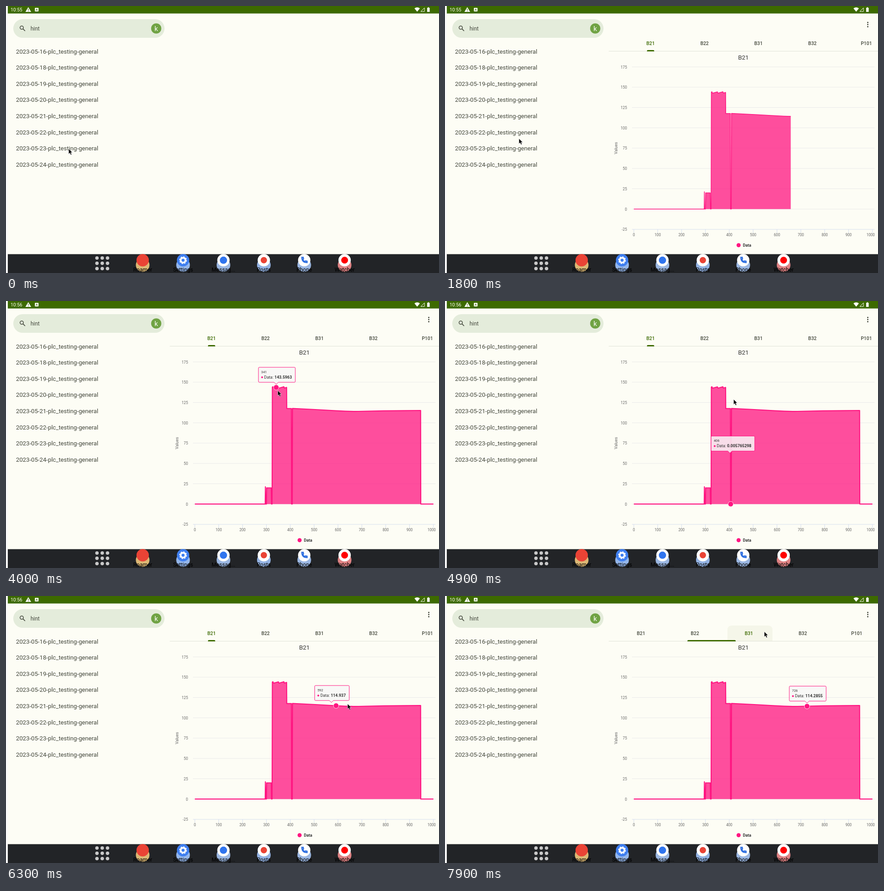
Write an HTML page that moves like this. It is 952 px wide and 588 px high and loops after 8000 ms.

```html
<!DOCTYPE html>
<html lang="en">
<head>
<meta charset="utf-8">
<style>
html, body { margin: 0; width: 100%; height: 100%; overflow: hidden; background: #fdfdf5; }
svg { display: block; width: 952px; height: 588px; font-family: Roboto, "Open Sans", sans-serif; }
.mid { text-anchor: middle; }
.end { text-anchor: end; }
.axis { font-size: 8.15px; fill: #666; }
.tab { font-size: 10.4px; font-weight: 500; fill: #44483d; text-anchor: middle; }
.tab.on { fill: #3d6a00; }
.list { font-size: 13.2px; fill: #44483d; }
.app { font-size: 12px; fill: #000; text-anchor: middle; }
</style>
</head>
<body>
<svg viewBox="0 0 952 588">
  <defs>
    <clipPath id="reveal"><rect id="revealBox" x="411" y="120" width="0" height="380"/></clipPath>
    <clipPath id="pane"><rect x="360" y="60" width="592" height="45"/></clipPath>
  </defs>
  <rect width="952" height="588" fill="#fdfdf5"/>
  <rect width="4" height="588" fill="#fafafa"/>

  <g id="status">
    <rect x="4" width="948" height="16.5" fill="#3d6a00"/>
    <text id="clock" x="10" y="12" font-size="10.4" fill="#fff"></text>
    <path d="M49 2.5L55.3 13H42.7Z" fill="#fff"/>
    <path d="M49 6v3.6M49 10.6v1.4" stroke="#3d6a00" stroke-width="1.2"/>
    <rect x="63.5" y="4" width="8" height="8" rx="1" fill="#fff"/>
    <path d="M65.7 10.3L67.5 5.8L69.3 10.3M66.4 8.9H68.6" fill="none" stroke="#3d6a00" stroke-width=".9"/>
    <path d="M904 12.5L898 5.3Q904 .9 910 5.3Z" fill="#fff"/>
    <path d="M912 12.2H920V4Z" fill="none" stroke="#fff"/>
    <path d="M926 4h1.6v-1.2h2.3V4h1.6v9h-5.5Z" fill="#fff"/>
  </g>

  <g id="search">
    <rect x="16" y="29" width="332.5" height="41" rx="20.5" fill="#e4ecdb"/>
    <circle cx="34.6" cy="47.6" r="3.7" fill="none" stroke="#44483d" stroke-width="1.5"/>
    <path d="M37.4 50.4L42 55" stroke="#44483d" stroke-width="1.7"/>
    <text x="54" y="53.8" font-size="11.9" fill="#44483d">hint</text>
    <circle cx="330.3" cy="49.5" r="11.2" fill="#70a344"/>
    <text class="mid" x="330.3" y="54.7" font-size="15" fill="#fff">k</text>
  </g>
  <g id="list"></g>

  <g id="detail">
    <g fill="#44483d"><circle cx="929.5" cy="36.2" r="1.5"/><circle cx="929.5" cy="40.8" r="1.5"/><circle cx="929.5" cy="45.4" r="1.5"/></g>
    <path d="M360 99.5H952" stroke="#e1e3d8"/>
    <g clip-path="url(#pane)">
      <path id="press" d="M621 99V75Q621 65 631 65H710Q720 65 720 75V99Z" fill="#f5f6e9"/>
      <g id="tabs"><path id="bar" fill="#3d6a00"/></g>
    </g>
  </g>

  <g id="chart">
    <g id="grid"></g>
    <text class="mid" x="656" y="117.8" font-size="13.3" fill="#333">B21</text>
    <text class="mid" transform="translate(379 313) rotate(-90)" font-size="8.9" fill="#666">Values</text>
    <g clip-path="url(#reveal)">
      <path id="area" fill="#ff1581" fill-opacity=".75"/>
      <path id="line" fill="none" stroke="#ff1581" stroke-linejoin="round"/>
    </g>
    <circle cx="645.5" cy="526.7" r="4.5" fill="#ff1581"/>
    <text x="655" y="530" font-size="8.9" font-weight="700" fill="#333">Data</text>
    <g id="hover">
      <circle id="dot" r="5.8" fill="#ff1581" stroke="#fff" stroke-width=".8"/>
      <g id="tip">
        <path id="frame" fill="#f7f7f7" fill-opacity=".85" stroke="#ff1581" stroke-width="1"/>
        <text id="tipX" x="6" y="12.8" font-size="7.4" fill="#333"></text>
        <circle cx="8" cy="22" r="2" fill="#ff1581"/>
        <text x="12.5" y="24.7" font-size="8.9" fill="#333">Data: <tspan id="tipV" font-weight="700"></tspan></text>
      </g>
    </g>
  </g>

  <g id="dock"><rect x="4" y="546.5" width="948" height="41.5" fill="#222427"/></g>
  <path id="cursor" d="M0 0V11.4L2.6 9L4.5 13.3L6.6 12.4L4.7 8.2H8.2Z" fill="#000" stroke="#fff" stroke-width=".6"/>
</svg>
<script>
const $ = id => document.getElementById(id);
const add = (id, html) => $(id).insertAdjacentHTML('beforeend', html);
const set = (id, attrs) => { for (const k in attrs) $(id).setAttribute(k, attrs[k]); };
const show = (id, on) => set(id, { visibility: on ? 'visible' : 'hidden' });
const clamp = v => Math.min(1, Math.max(0, v));
const px = v => 415.2 + .5245 * v;
const py = v => 447.2 - 1.789 * v;

// Static parts
[16, 18, 19, 20, 21, 22, 23, 24].forEach((d, i) =>
  add('list', `<text class="list" x="22" y="${104.8 + 35.55 * i}">2023-05-${d}-plc_testing-general</text>`));

['B21', 'B22', 'B31', 'B32', 'P101'].forEach((name, i) =>
  add('tabs', `<text class="tab" x="${452 + 118.6 * i}" y="86.3">${name}</text>`));
const tabTexts = document.querySelectorAll('.tab');

for (let v = -25; v <= 175; v += 25)
  add('grid', `<path d="M411 ${py(v)}H944.5" stroke="${v < 0 ? '#ccd6eb' : '#e6e6e6'}" stroke-width=".8"/>
    <text class="axis end" x="400" y="${py(v) + 3.4}">${v}</text>`);
for (let v = 0; v <= 1000; v += 100)
  add('grid', `<path d="M${px(v)} 492V499.5" stroke="#ccd6eb" stroke-width=".8"/>
    <text class="axis mid" x="${v < 1000 ? px(v) : 935.8}" y="507">${v}</text>`);

const curve = 'M415.2 447.2H569.8L570.3 409L571 447.2H572.6L573 411.5H583.2L583.7 447.2H585L585.6 189.5L587 188.8L588 192' +
  'L599 189L600 192L611 188.8L612 191.8L617 190.3L617.3 236.8H627.5L627.9 447.2H629.4L629.9 236.6' +
  'L680 239L725 241.6Q755 243.4 775 243L830 241.9L880 241.3L911.6 241L912 447.2H939.7';
set('area', { d: curve + 'Z' });
set('line', { d: curve });

for (let i = 0; i < 9; i++)
  add('dock', `<circle cx="${200 + 11.6 * (i % 3)}" cy="${555 + 11.6 * (i / 3 | 0)}" r="3.8" fill="#c9c9c9"/>`);
const gear = (x, y) => `<circle cx="${x}" cy="${y}" r="5.2" fill="none" stroke="#fff" stroke-width="3.6"/>
  <circle cx="${x}" cy="${y}" r="7.4" fill="none" stroke="#fff" stroke-width="2" stroke-dasharray="3.4 2.41"/>`;
const handset = (x, y) => `<path transform="translate(${x} ${y})" fill="none" stroke="#2f6fe0" stroke-width="2.6"
  d="M-5.2 -6.2H-2.2L-1.6 -2.8L-3.4 -1.4Q-1.8 1.8 1.4 3.4L2.8 1.6L6.2 2.2V5.2Q-5.2 5.2 -5.2 -6.2Z"/>`;
const blob = (color, r) => (x, y) => `<circle cx="${x}" cy="${y}" r="${r}" fill="${color}"/>`;
[
  ['Roamer', '#dcb875', '#ea4335', blob('#ea4335', 13)],
  ['Settings', '#94b6ea', '#3f7ff0', gear],
  ['Messag...', '#9bb7e2', '#fff', blob('#2f74ee', 8)],
  ['Posts', '#93b2e2', '#fff', blob('#ea4335', 7)],
  ['Phone', '#9bb7e2', '#fff', handset],
  ['Watcher', '#e08384', '#fff', blob('#f00', 7.5)]
].forEach(([name, back, plate, mark], i) => {
  const x = 300.5 + 88.8 * i;
  add('dock', blob(back, 15)(x, 570.5) + blob(plate, 13.6)(x, 559.8) + mark(x, 559.8) +
    `<text class="app" x="${x}" y="584.8">${name}</text>`);
});

// Pointer path: time, x, y
const path = [
  [0, 137.8, 314.5], [700, 137.8, 314.5], [1800, 162.6, 292], [2400, 460, 237], [2500, 460, 237],
  [3500, 597.5, 197.3], [4000, 597.5, 197.3], [4900, 634.5, 216.5], [5700, 690, 236],
  [6300, 751, 237.5], [6600, 814, 241], [6800, 814, 238], [7500, 702, 78.5], [8000, 702, 78.5]
];
function pointer(t) {
  const i = path.findIndex(k => k[0] > t);
  const [t0, x0, y0] = path[i - 1], [t1, x1, y1] = path[i];
  const p = (t - t0) / (t1 - t0);
  return [x0 + (x1 - x0) * p, y0 + (y1 - y0) * p];
}

// Hovered points: time, x value, label
const hovers = [
  [3500, 341, '143.5963'], [4250, 371, '144.1527'], [4500, 391, '117.8821'], [4700, 403, '117.8514'],
  [4865, 406, '0.005765298'], [5250, 412, '117.8136'], [5550, 444, '117.3642'],
  [6130, 592, '114.937'], [6500, 700, '114.1926'], [6680, 726, '114.2855']
];
const tipWidth = label => 41 + 5 * label.length;

// The tooltip closes a third of the x gap and half of the y gap every 32 ms
function tooltip(t) {
  let pos, cur;
  hovers.forEach((h, i) => {
    if (h[0] > t) return;
    const x = px(h[1]), y = py(+h[2]), w = tipWidth(h[2]);
    const goal = [x + 1.5 - w / 2, y - 44.3, x];
    const until = Math.min(t, i + 1 < hovers.length ? hovers[i + 1][0] : t);
    const n = Math.floor((until - h[0]) / 32);
    const rate = [2 / 3, 1 / 2, 2 / 3];
    pos = pos ? goal.map((g, k) => g + (pos[k] - g) * rate[k] ** n) : goal;
    cur = { x, y, w, name: h[1], label: h[2] };
  });
  return cur && { ...cur, left: pos[0], top: pos[1], anchor: pos[2] - pos[0] };
}

// cubic-bezier(.4, 0, .2, 1)
function standardEase(p) {
  let lo = 0, hi = 1;
  for (let i = 0; i < 24; i++) {
    const s = (lo + hi) / 2, r = 1 - s;
    if (1.2 * r * r * s + .6 * r * s * s + s ** 3 < p) lo = s; else hi = s;
  }
  return p >= 1 ? 1 : lo * lo * (3 - 2 * lo);
}

function drawTabs(t) {
  const f = standardEase(clamp((t - 7776) / 300)), a = f * Math.PI / 2;
  const left = 444 + 237.2 * (1 - Math.cos(a)), right = 460 + 237.2 * Math.sin(a);
  set('tabs', { transform: `translate(${-33 * f})` });
  set('bar', { d: `M${left} 100V99Q${left} 97 ${left + 2} 97H${right - 2}Q${right} 97 ${right} 99V100Z` });
  const chosen = t >= 7776 ? 2 : 0;
  tabTexts.forEach((el, i) => el.classList.toggle('on', i === chosen));
  show('press', t >= 7776);
}

function drawTooltip(t) {
  const tip = tooltip(t);
  show('hover', tip);
  set('line', { 'stroke-width': tip ? 2.2 : 1.5 });
  if (!tip) return;
  const { w, anchor } = tip;
  set('dot', { cx: tip.x, cy: tip.y });
  set('tip', { transform: `translate(${tip.left} ${tip.top})` });
  set('frame', { d: `M2 0H${w - 2}Q${w} 0 ${w} 2V31Q${w} 33 ${w - 2} 33H${anchor + 4.5}L${anchor} 37.5L${anchor - 4.5} 33H2Q0 33 0 31V2Q0 0 2 0Z` });
  $('tipX').textContent = tip.name;
  $('tipV').textContent = tip.label;
}

function draw(t) {
  $('clock').textContent = t < 2100 ? '10:55' : '10:56';
  show('detail', t >= 800);
  show('chart', t >= 1200);
  const p = clamp((t - 1200) / 1000);
  set('revealBox', { width: 533.5 * (1 - Math.cos(Math.PI * p)) / 2 });
  if (t >= 800) drawTabs(t); else show('press', false);
  drawTooltip(t);
  set('cursor', { transform: `translate(${pointer(t)})` });
}

const start = performance.now();
function tick() {
  const t = (performance.now() - start) % 8000;
  draw(Math.floor(t / 100) * 100);
  requestAnimationFrame(tick);
}
tick();
</script>
</body>
</html>
```
